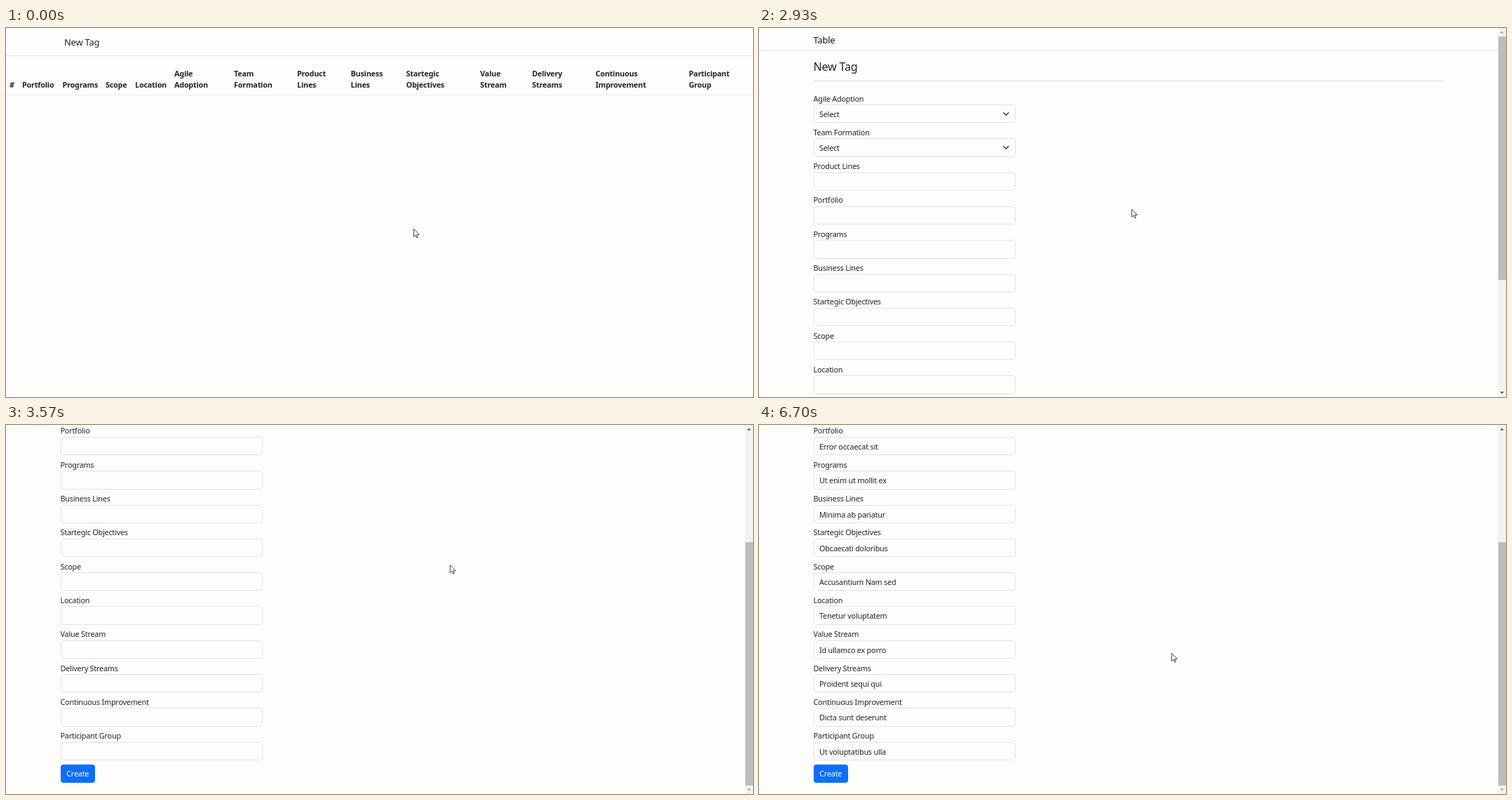
These frames come from a looping animation (1065x526 px, 8000 ms). An HTML page:

```html
<!DOCTYPE html>
<html lang="en">
<head>
<meta charset="utf-8">
<title>New Tag</title>
<style>
  html, body { margin: 0; width: 100%; height: 100%; overflow: hidden; background: #fdfdfc; }
  body {
    position: relative;
    font: 10.8px/16px "Noto Sans", "Open Sans", sans-serif;
    letter-spacing: -.2px;
    color: #212529;
  }
  body * { position: absolute; box-sizing: border-box; white-space: nowrap; }
  .page { inset: 0; overflow: hidden; }
  .rule { height: 1px; left: 0; right: 0; }
  svg { overflow: visible; }

  /* table page */
  #table { animation: table 8s step-end infinite; }
  #table .brand { left: 83px; top: 12px; font-size: 12.9px; }
  #table b { top: 0; bottom: 430px; }
  #table b span { left: 0; bottom: 6px; line-height: 16.7px; white-space: pre; }

  /* form page */
  #form { visibility: hidden; animation: form 8s step-end infinite; }
  #sheet { left: 0; top: 0; width: 1054px; height: 763px; animation: scroll 8s linear infinite; }
  #sheet .brand { left: 77.5px; top: 9px; font-size: 12.9px; color: #101316; }
  h4 { margin: 0; left: 77.5px; top: 44px; font-size: 16.1px; line-height: 22px; font-weight: 500; }
  .field { left: 77.5px; width: 288px; height: 43px; }
  .field label { left: 0; top: 0; }
  .box {
    left: 0; top: 16.5px; width: 288px; height: 26.4px;
    border: 1px solid #e2e3e8; border-radius: 4px;
    padding-left: 7.5px; line-height: 25px;
  }
  .box span { position: static; }
  .value { animation: fill 8s step-end infinite; }
  .box svg { left: 269px; top: 9.5px; }
  #create {
    left: 77.5px; top: 720.5px; width: 49.5px; height: 26px; border-radius: 4px;
    background: #0d6efd; color: #fff; text-align: center; line-height: 26px;
    animation: press 8s linear infinite;
  }

  /* scrollbar */
  #bar { left: 1054px; top: 0; width: 11px; height: 526px; background: #f2f2f1; }
  #thumb { left: 0; top: 12px; width: 11px; height: 347px; background: #bdbdbd; animation: thumb 8s linear infinite; }
  #up { animation: up 8s step-end infinite; }
  #down { animation: down 8s step-end infinite; }

  /* pointer */
  #pointer { left: 0; top: 0; animation: move 8s ease-in-out infinite; }
  #pointer path { fill: #fff; stroke: #23233a; stroke-linejoin: round; }
  #arrow { left: 0; top: 0; animation: arrow 8s step-end infinite; }
  #hand { left: -4.3px; top: -1px; animation: hand 8s step-end infinite; }

  @keyframes table { 0% { visibility: visible; } 25.86%, 100% { visibility: hidden; } }
  @keyframes form { 0% { visibility: hidden; } 25.86%, 100% { visibility: visible; } }
  @keyframes fill { 0% { opacity: 0; } 57.49%, 100% { opacity: 1; } }
  @keyframes scroll {
    0%, 37% { transform: translateY(0); }
    38.375% { transform: translateY(-78px); }
    39.5% { transform: translateY(-146px); }
    41.25% { transform: translateY(-224px); }
    42.125%, 100% { transform: translateY(-237px); }
  }
  @keyframes thumb {
    0%, 37% { transform: translateY(0); }
    38.375% { transform: translateY(51px); }
    39.5% { transform: translateY(96px); }
    41.25% { transform: translateY(147px); }
    42.125%, 100% { transform: translateY(155px); }
  }
  @keyframes up { 0% { fill: #a3a3a3; } 37%, 100% { fill: #505050; } }
  @keyframes down { 0% { fill: #505050; } 42.125%, 100% { fill: #a3a3a3; } }
  @keyframes press {
    0%, 72.2% { background: #0d6efd; }
    73.7%, 79.2% { background: #0b5ed7; }
    81%, 100% { background: #0d6efd; }
  }
  @keyframes move {
    0%, .375% { transform: translate(581px, 286px); }
    6.625%, 8.75% { transform: translate(360px, 169px); }
    18.375%, 29.125% { transform: translate(117px, 17px); }
    36.5%, 38.375% { transform: translate(531px, 258px); }
    41.25%, 42.6% { transform: translate(535px, 261px); }
    48.75%, 59.625% { transform: translate(962px, -9px); }
    61.625%, 63.75% { transform: translate(965px, -6px); }
    73.75%, 78.75% { transform: translate(106px, 503px); }
    83.75%, 100% { transform: translate(588px, 325px); }
  }
  @keyframes arrow {
    0%, 30.5%, 79.5%, 100% { opacity: 1; }
    16.2%, 72.4% { opacity: 0; }
  }
  @keyframes hand {
    0%, 30.5%, 79.5%, 100% { opacity: 0; }
    16.2%, 72.4% { opacity: 1; }
  }
</style>
</head>
<body>
  <div class="page" id="table">
    <div class="brand">New Tag</div>
    <div class="rule" style="top:39px;background:#e6e6d9"></div>
    <div class="rule" style="top:95px;background:#eeeede"></div>
  </div>

  <div class="page" id="form">
    <div id="sheet">
      <div class="brand">Table</div>
      <div class="rule" style="top:32px;background:#e5e6d8"></div>
      <h4>New Tag</h4>
      <div class="rule" style="top:75px;left:78px;width:898px;background:#d8d8ec"></div>
      <div id="create">Create</div>
    </div>
    <div id="bar">
      <div id="thumb"></div>
      <svg width="11" height="526">
        <path id="up" d="M2.6 7.5L5.3 4.5L8 7.5Z"/>
        <path id="down" d="M2.6 518.5L5.3 521.5L8 518.5Z"/>
      </svg>
    </div>
  </div>

  <div id="pointer">
    <svg id="arrow" width="9" height="14">
      <path stroke-width="1.2" transform="scale(.7)" d="M.5.5V16.5L4.2 13L6.6 18.6L9 17.6L6.6 12.1H11.8Z"/>
    </svg>
    <svg id="hand" width="12" height="17">
      <path stroke-width=".9" d="M3.2 9.5V1.7a1.1 1.1 0 0 1 2.2 0V6c.4-.9 1.9-.8 2 .3c.5-.7 1.7-.5 1.8.5c.6-.5 1.5-.2 1.5.8V10.5c0 2-1 2.7-1.2 5H4.2C4 13.5 1.5 11.5.7 9.6c-.3-.9.8-1.6 1.5-.9z"/>
    </svg>
  </div>

<script>
  const columns = [
    [5, "#"], [23, "Portfolio"], [80.5, "Programs"], [142, "Scope"], [184, "Location"],
    [240, "Agile\nAdoption"], [325, "Team\nFormation"], [415, "Product\nLines"],
    [491.5, "Business\nLines"], [570.5, "Startegic\nObjectives"], [676, "Value\nStream"],
    [750, "Delivery\nStreams"], [840.5, "Continuous\nImprovement"], [973.5, "Participant\nGroup"]
  ];
  // An empty value marks a drop-down or an input left out of view.
  const fields = [
    ["Agile Adoption", ""], ["Team Formation", ""], ["Product Lines", ""],
    ["Portfolio", "Error occaecat sit"], ["Programs", "Ut enim ut mollit ex"],
    ["Business Lines", "Minima ab pariatur"], ["Startegic Objectives", "Obcaecati doloribus"],
    ["Scope", "Accusantium Nam sed"], ["Location", "Tenetur voluptatem"],
    ["Value Stream", "Id ullamco ex porro"], ["Delivery Streams", "Proident sequi qui"],
    ["Continuous Improvement", "Dicta sunt deserunt"], ["Participant Group", "Ut voluptatibus ulla"]
  ];
  const chevron = '<svg width="8" height="6"><path d="M.7 .8L4.2 4.3L7.7 .8" fill="none" ' +
    'stroke="#343a40" stroke-width="1.4" stroke-linecap="round" stroke-linejoin="round"/></svg>';

  const add = (id, html) => document.getElementById(id).insertAdjacentHTML("beforeend", html);

  add("table", columns.map(([x, text]) =>
    `<b style="left:${x}px"><span>${text}</span></b>`).join(""));

  add("sheet", fields.map(([label, value], i) => {
    const inner = i < 2 ? "<span>Select</span>" + chevron : `<span class="value">${value}</span>`;
    return `<div class="field" style="top:${(92.5 + 48.3 * i).toFixed(1)}px">` +
      `<label>${label}</label><div class="box">${inner}</div></div>`;
  }).join(""));
</script>
</body>
</html>
```
